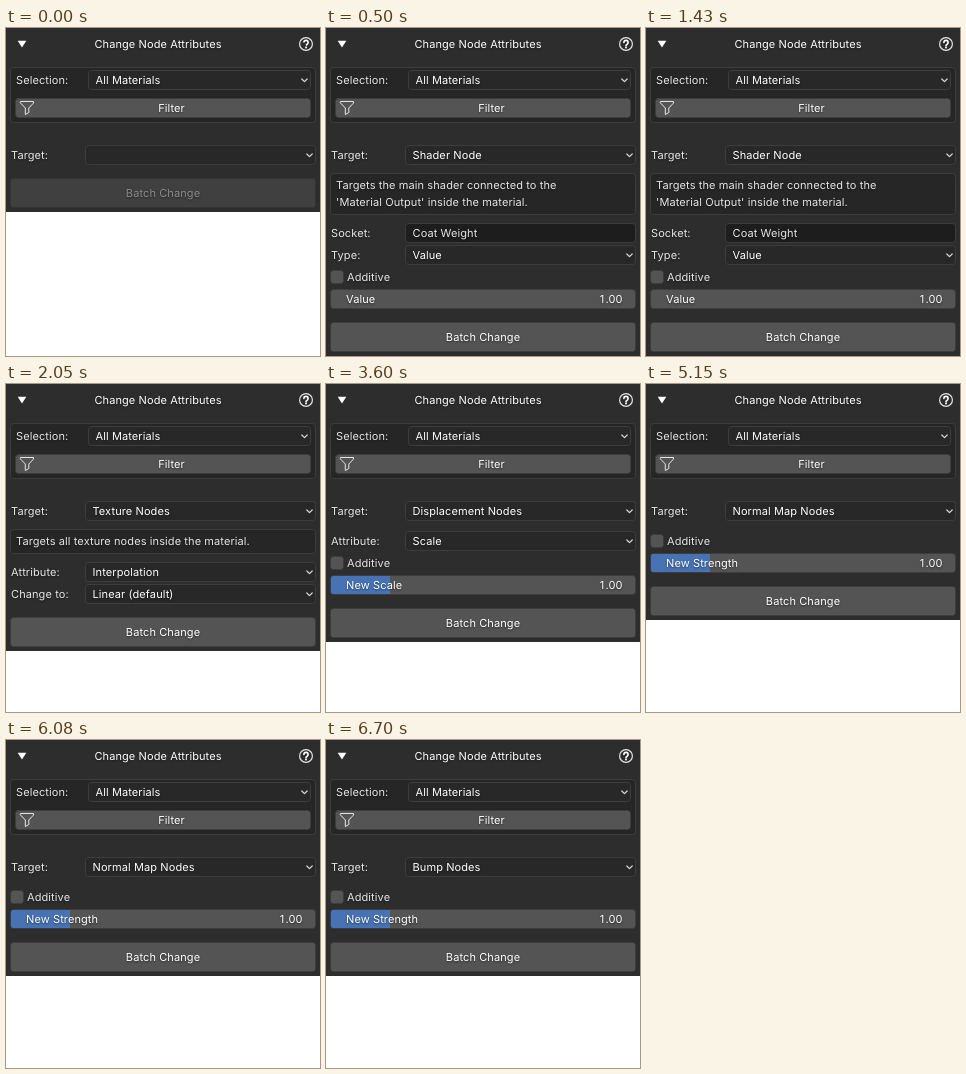
Animation of 314 by 328 pixels, one loop 8 s. Source, as an HTML page with a canvas:

```html
<!DOCTYPE html>
<html lang="en">
<head>
<meta charset="utf-8">
<title>Change Node Attributes</title>
<style>
html, body { margin: 0; width: 314px; height: 328px; overflow: hidden; background: #fff; }
canvas { display: block; width: 314px; height: 328px; }
</style>
</head>
<body>
<canvas id="stage"></canvas>
<script>
const W = 314, H = 328, LOOP = 8000;
const canvas = document.getElementById('stage');
const ctx = canvas.getContext('2d');
const ratio = window.devicePixelRatio || 1;
canvas.width = W * ratio;
canvas.height = H * ratio;
ctx.scale(ratio, ratio);

const FONT = '11px Inter, "Noto Sans", sans-serif';
const INK = '#e6e6e6', EDGE = '#3d3d3d', BUTTON = '#545454', BLUE = '#4772b3';

function text(str, x, mid, color = INK, align = 'left') {
  ctx.save();
  ctx.font = FONT;
  ctx.textRendering = 'geometricPrecision';
  ctx.letterSpacing = '0.1px';
  ctx.textAlign = align;
  ctx.fillStyle = color;
  ctx.shadowColor = 'rgba(0, 0, 0, 0.5)';
  ctx.shadowBlur = 2 * ratio;
  ctx.shadowOffsetY = ratio;
  ctx.fillText(str, x, mid + 4);
  ctx.restore();
}

// Right-aligned number with digits of equal width.
function digits(str, right, mid) {
  ctx.font = FONT;
  for (const ch of [...str].reverse()) {
    const cell = ctx.measureText(ch === '.' ? '.' : '0').width;
    text(ch, right - cell / 2, mid, '#fff', 'center');
    right -= cell;
  }
}

function box(x, y, w, h, fill, edge = EDGE, r = 3) {
  ctx.beginPath();
  ctx.roundRect(x + 0.5, y + 0.5, w - 1, h - 1, r);
  ctx.fillStyle = fill;
  ctx.fill();
  ctx.strokeStyle = edge;
  ctx.lineWidth = 1;
  ctx.stroke();
}

function line(points, width = 1.3, color = INK, close = false) {
  ctx.beginPath();
  points.forEach(([x, y]) => ctx.lineTo(x, y));
  if (close) ctx.closePath();
  ctx.strokeStyle = color;
  ctx.lineWidth = width;
  ctx.lineJoin = ctx.lineCap = 'round';
  ctx.stroke();
}

function menu(label, value, y, labelX = 5, x = 79, right = 310) {
  text(label, labelX, y + 10);
  box(x, y, right - x, 20, '#282828');
  text(value, x + 7.5, y + 10, '#fff');
  const cx = right - 6.5;
  line([[cx - 2.7, y + 9], [cx, y + 11.7], [cx + 2.7, y + 9]], 1.2, '#d8d8d8');
}

function field(label, value, y) {
  text(label, 5, y + 10);
  box(79, y, 231, 20, '#1d1d1d');
  text(value, 86.5, y + 10);
}

function note(lines, y) {
  box(4, y, 306, 8 + 17 * lines.length, '#262626');
  lines.forEach((s, i) => text(s, 10, y + 12 + 17 * i));
}

function checkbox(label, mid) {
  box(4, mid - 7, 14, 14, BUTTON);
  text(label, 21, mid);
}

function number(label, value, y, fillTo = 0) {
  box(4, y, 306, 20, BUTTON);
  if (fillTo) {
    ctx.beginPath();
    ctx.roundRect(5, y + 1, fillTo - 5, 18, [2.5, 0, 0, 2.5]);
    ctx.fillStyle = BLUE;
    ctx.fill();
  }
  text(label, 20, y + 10, '#fff');
  digits(value, 296.5, y + 10);
}

function header() {
  ctx.beginPath();
  [[11.7, 12.8], [20.3, 12.8], [16, 19.6]].forEach(p => ctx.lineTo(...p));
  ctx.fillStyle = '#fff';
  ctx.fill();
  text('Change Node Attributes', 152, 16, '#fff', 'center');
  ctx.beginPath();
  ctx.arc(300, 16, 6.4, 0, 7);
  ctx.strokeStyle = INK;
  ctx.lineWidth = 1.2;
  ctx.stroke();
  ctx.beginPath();
  ctx.arc(300, 14.5, 2.1, Math.PI, Math.PI * 2.3);
  ctx.lineTo(300, 17.4);
  ctx.strokeStyle = '#fff';
  ctx.lineWidth = 1.6;
  ctx.stroke();
  ctx.fillStyle = '#fff';
  ctx.fillRect(299.1, 18.5, 1.8, 1.8);
}

function selection() {
  box(4, 39, 306, 56, '#262626');
  menu('Selection:', 'All Materials', 42, 10, 82, 305);
  box(9, 70, 296, 20, BUTTON);
  text('Filter', 165.5, 80, '#fff', 'center');
  line([[14.5, 73.5], [27.5, 73.5], [27.5, 75], [22.8, 80], [22.8, 84.5], [19.3, 86.5], [19.3, 80], [14.5, 75]], 1, INK, true);
}

function strength() {
  checkbox('Additive', 157);
  number('New Strength', '1.00', 169, 64);
}

const states = [
  { at: 0, target: '', height: 184, draw() {} },
  { at: 500, target: 'Shader Node', height: 328, draw() {
    note(['Targets the main shader connected to the', "'Material Output' inside the material."], 145);
    field('Socket:', 'Coat Weight', 195);
    menu('Type:', 'Value', 217);
    checkbox('Additive', 249);
    number('Value', '1.00', 261);
  } },
  { at: 2050, target: 'Texture Nodes', height: 267, draw() {
    note(['Targets all texture nodes inside the material.'], 145);
    menu('Attribute:', 'Interpolation', 178);
    menu('Change to:', 'Linear (default)', 200);
  } },
  { at: 3600, target: 'Displacement Nodes', height: 258, draw() {
    menu('Attribute:', 'Scale', 147);
    checkbox('Additive', 179);
    number('New Scale', '1.00', 191, 64);
  } },
  { at: 5150, target: 'Normal Map Nodes', height: 236, draw: strength },
  { at: 6700, target: 'Bump Nodes', height: 236, draw: strength }
];

function render(time) {
  const state = states.findLast(s => s.at <= time);
  ctx.fillStyle = '#fff';
  ctx.fillRect(0, 0, W, H);
  ctx.fillStyle = '#2d2d2d';
  ctx.fillRect(0, 0, W, state.height);
  header();
  selection();
  menu('Target:', state.target, 117);
  state.draw();
  const top = state.height - 34, on = state.target !== '';
  box(4, top, 306, 30, on ? BUTTON : '#404040', on ? EDGE : '#353535');
  text('Batch Change', 157, top + 15, on ? '#fff' : '#8c8c8c', 'center');
}

let start;
function tick(now) {
  start ??= now;
  render((now - start) % LOOP);
  requestAnimationFrame(tick);
}
requestAnimationFrame(tick);
</script>
</body>
</html>
```
